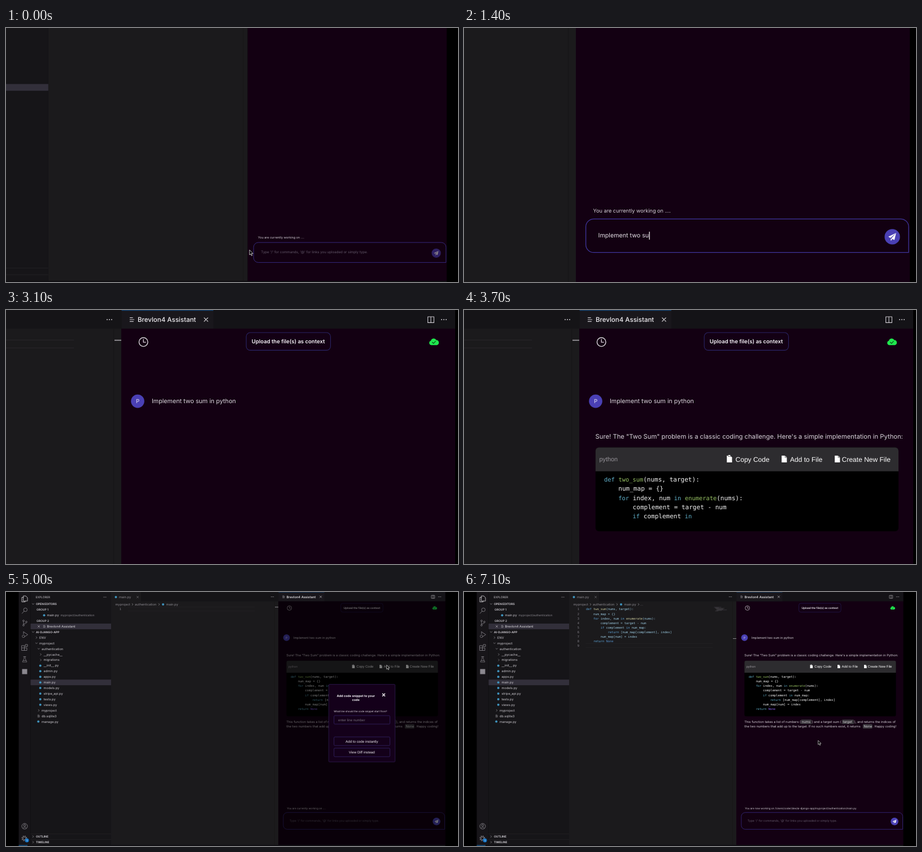
These frames come from a looping animation (800 px wide and 450 px high, 7.2 s). An HTML page:

```html
<!DOCTYPE html>
<html lang="en">
<head>
<meta charset="utf-8">
<title>Coding assistant demo</title>
<style>
  html, body { margin: 0; width: 100%; height: 100%; overflow: hidden; background: #000; }
  svg { display: block; width: 800px; height: 450px; }
  text { font-family: Inter, "Open Sans", sans-serif; white-space: pre; text-rendering: geometricPrecision; }
  .ui { font-family: "Liberation Sans", Arial, sans-serif; }
  .mono { font-family: "DejaVu Sans Mono", monospace; }
  .line { fill: none; stroke-linecap: round; stroke-linejoin: round; }
</style>
</head>
<body>
<svg id="stage" viewBox="0 0 800 450"></svg>
<script>
const LOOP = 7200, STEP = 100;
const PROMPT = 'Implement two sum in python';
const INTRO = 'Sure! The "Two Sum" problem is a classic coding challenge. Here\'s a simple implementation in Python:';
const CODE = [
  [0, 'def two_sum(nums, target):'],
  [1, 'num_map = {}'],
  [1, 'for index, num in enumerate(nums):'],
  [2, 'complement = target - num'],
  [2, 'if complement in num_map:'],
  [3, 'return [num_map[complement], index]'],
  [2, 'num_map[num] = index'],
  [1, 'return None']
];
const ASSISTANT = 'Brevlon4 Assistant';
const IDLE = 'You are currently working on ....';
const LINKED = 'You are now working on /Users/coder/dev/ai-django-app/myproject/authentication/main.py';
const GREY = '#8b888f', PALE = '#c9c6cc', VIOLET = '#4a40b4';

function el(tag, attrs, parent, text) {
  const node = document.createElementNS('http://www.w3.org/2000/svg', tag);
  for (const key in attrs) node.setAttribute(key, attrs[key]);
  if (text !== undefined) node.textContent = text;
  parent.append(node);
  return node;
}
const group = parent => el('g', {}, parent);
const rect = (p, x, y, x2, y2, fill, more) =>
  el('rect', { x, y, width: x2 - x, height: y2 - y, fill, ...more }, p);
const dot = (p, cx, cy, r, fill, more) => el('circle', { cx, cy, r, fill, ...more }, p);
const line = (p, d, stroke, width = 0.6) =>
  el('path', { d, stroke, 'stroke-width': width, class: 'line' }, p);
// y is the visual middle of the text
const text = (p, x, y, str, size, fill, more) =>
  el('text', { x, y: y + size * 0.35, 'font-size': size, fill, ...more }, p, str);
const show = (node, on) => node.setAttribute('visibility', on ? 'visible' : 'hidden');

const cam = group(document.getElementById('stage'));

function ellipsis(p, x, y) {
  for (const dx of [-2, 0, 2]) dot(p, x + dx, y, 0.5, PALE);
}
function cross(p, x, y, r, color, width) {
  line(p, `M${x - r} ${y - r}l${2 * r} ${2 * r}m0 ${-2 * r}l${-2 * r} ${2 * r}`, color, width);
}
function chevron(p, x, y, open) {
  line(p, open ? `M${x - 1.6} ${y - 0.8}l1.6 1.6 1.6 -1.6` : `M${x - 0.8} ${y - 1.6}l1.6 1.6 -1.6 1.6`, PALE, 0.5);
}
function listIcon(p, x, y) {
  line(p, `M${x - 1.8} ${y - 1.7}h2.400M${x - 1.8} ${y}h3.600M${x - 1.8} ${y + 1.7}h3`, PALE, 0.55);
}
const fileDot = (p, x, y) => dot(p, x, y, 2, '#3f93bd');

// Activity bar
function drawActivity() {
  const g = group(cam);
  rect(g, 22.5, 0, 43.5, 448, '#171519');
  line(g, 'M31 7h4l3 3v6h-7zM31 9.5h-3v8h6v-1.5', '#d8d6da', 0.8);
  dot(g, 34.3, 31.5, 3.2, 'none', { stroke: GREY, 'stroke-width': 0.8 });
  line(g, 'M32 34l-3.6 4', GREY, 0.8);
  for (const [x, y] of [[31, 51], [31, 59], [36, 53]])
    dot(g, x, y, 1.4, 'none', { stroke: GREY, 'stroke-width': 0.7 });
  line(g, 'M31 52.4v5.2M36 54.4q0 2-5 2.6', GREY, 0.7);
  line(g, 'M31 70.500l7.500 5 -6 4M31 70.500v4', GREY, 0.8);
  dot(g, 30.8, 78.5, 2.2, 'none', { stroke: GREY, 'stroke-width': 0.7 });
  line(g, 'M28 95h4.500v8.500h-4.500zM28 99h9v4.500h-4.500M34.500 93h3.600v3.600h-3.600z', GREY, 0.8);
  line(g, 'M31 114.500h4M32 114.500v3.500l-3 6h8l-3-6v-3.500M30.500 121.500h5', GREY, 0.7);
  rect(g, 28.5, 136.5, 37.5, 145.5, GREY);
  dot(g, 33, 415, 5, 'none', { stroke: GREY, 'stroke-width': 0.8 });
  dot(g, 33, 413.5, 1.8, 'none', { stroke: GREY, 'stroke-width': 0.8 });
  line(g, 'M29.800 418.500q3.200-4 6.400 0', GREY, 0.8);
  dot(g, 32.5, 436.5, 4, 'none', { stroke: GREY, 'stroke-width': 1.6, 'stroke-dasharray': '1.8 1.34' });
  dot(g, 32.5, 436.5, 2.4, 'none', { stroke: GREY, 'stroke-width': 0.8 });
  dot(g, 37, 440, 3.5, '#1677c9');
  text(g, 37, 440, '1', 4.4, '#fff', { 'text-anchor': 'middle' });
}

// Explorer
function drawExplorer() {
  const g = group(cam), rowY = i => 21.3 + 9.92 * i;
  const bold = { 'font-weight': 700 };
  rect(g, 43.5, 0, 186, 448, '#161518');
  for (const i of [4, 14]) rect(g, 43.5, rowY(i) - 5, 186, rowY(i) + 5, '#322f3a');
  text(g, 52.5, 9, 'EXPLORER', 5, PALE);
  ellipsis(g, 175, 9);
  text(g, 53, rowY(0), 'OPEN EDITORS', 5, PALE, bold);
  chevron(g, 48, rowY(0), true);
  text(g, 54, rowY(1), 'GROUP 1', 5, PALE, { 'font-weight': 600 });
  fileDot(g, 67.5, rowY(2));
  text(g, 72.5, rowY(2), 'main.py', 5.7, PALE);
  text(g, 96.5, rowY(2), 'myproject/authentication', 5.08, GREY);
  text(g, 54, rowY(3), 'GROUP 2', 5, PALE, { 'font-weight': 600 });
  cross(g, 58, rowY(4), 1.6, PALE, 0.6);
  listIcon(g, 68, rowY(4));
  text(g, 72.5, rowY(4), ASSISTANT, 5.7, '#dddbe0');
  text(g, 53, rowY(5), 'AI-DJANGO-APP', 5, PALE, bold);
  chevron(g, 48, rowY(5), true);
  // name, text x, kind: ">" closed folder, "v" open folder, "." file, "=" database
  const tree = [
    ['ENV', 59, '>'], ['myproject', 59, 'v'], ['authentication', 63, 'v'],
    ['__pycache__', 66.5, '>'], ['migrations', 66.5, '>'], ['__init__.py', 66.5, '.'],
    ['admin.py', 66.5, '.'], ['apps.py', 66.5, '.'], ['main.py', 66.5, '.'],
    ['models.py', 66.5, '.'], ['stripe_api.py', 66.5, '.'], ['tests.py', 66.5, '.'],
    ['views.py', 66.5, '.'], ['myproject', 63, '>'], ['db.sqlite3', 63, '='], ['manage.py', 63, '.']
  ];
  tree.forEach(([name, x, kind], i) => {
    const y = rowY(6 + i);
    if (kind === '.') fileDot(g, x - 5.8, y);
    else if (kind === '=') listIcon(g, x - 5, y);
    else chevron(g, x - 5, y, kind === 'v');
    text(g, x, y, name, 5.7, PALE);
  });
  [['OUTLINE', 433.3], ['TIMELINE', 443.2]].forEach(([name, y]) => {
    line(g, `M43.500 ${y - 4.6}H186`, '#2a282d', 0.5);
    chevron(g, 48, y, false);
    text(g, 53, y, name, 5, PALE, bold);
  });
}

// Code highlighting
const WORDS = /(\b(?:def|for|in|if|return|None|two_sum|enumerate)\b)/;
function kindOf(part) {
  if (part === 'None') return 'none';
  if (part === 'two_sum' || part === 'enumerate') return 'name';
  return WORDS.test(part) ? 'key' : 'plain';
}
const split = str => str.split(WORDS).filter(Boolean);

// Editor
let pasted, firstLine, caretRow, crumbMore;
function drawEditor() {
  const g = group(cam), rowY = i => 30.6 + 8.08 * i;
  const colors = { plain: '#9ccbe2', key: '#5fa5d8', name: '#cfcfa0', none: '#5691cc' };
  rect(g, 186, 0, 482, 448, '#1b1a1c');
  rect(g, 239, 0, 482, 16.5, '#151417');
  fileDot(g, 194.5, 9);
  text(g, 200, 9, 'main.py', 5.7, GREY);
  cross(g, 233, 9, 1.6, GREY, 0.5);
  ellipsis(g, 471.5, 8.5);
  text(g, 193.5, 22, 'myproject', 5.6, GREY);
  chevron(g, 224, 22, false);
  text(g, 228, 22, 'authentication', 5.7, GREY);
  chevron(g, 271, 22, false);
  fileDot(g, 278, 22);
  text(g, 283.5, 22, 'main.py', 5.7, GREY);
  crumbMore = group(g);
  chevron(crumbMore, 309, 22, false);
  text(crumbMore, 312, 22, '...', 5.6, GREY);
  line(g, 'M475.300 17V448', '#161517', 0.5);

  const number = (p, i) => text(p, 204, rowY(i), i + 1, 5.37, '#85828a', { 'text-anchor': 'end', class: 'mono' });
  firstLine = number(g, 0);
  pasted = group(g);
  for (let i = 0; i < 9; i++) number(pasted, i);
  CODE.forEach(([depth, str], i) => {
    const row = text(pasted, 216 + depth * 12.93, rowY(i), '', 5.37, '', { class: 'mono' });
    for (const part of split(str)) el('tspan', { fill: colors[kindOf(part)] }, row, part);
    line(pasted, `M${443 + depth * 1.9} ${27 + i * 0.95}h${str.length * 0.46}`, '#625f66', 0.4);
  });
  caretRow = group(g);
  line(caretRow, 'M216 26.600H440M216 33.600H440', '#29272b', 0.5);
}

// Chat panel
const stream = [];
let streamLength = 0;
function streamed(node, str, box) {
  stream.push({ node, str, box, from: streamLength });
  streamLength += str.length;
}
function pageIcon(p, x, y, clip) {
  el('path', { d: `M${x - 2.3} ${y - 3}h3l1.600 1.600v4.400h-4.600z`, fill: '#fff' }, p);
  if (clip) rect(p, x - 1.2, y - 3.6, x + 1, y - 2.2, '#fff', { stroke: '#2d2c2f', 'stroke-width': 0.3 });
  else line(p, `M${x + 0.7} ${y - 3}v1.600h1.600`, '#2d2c2f', 0.35);
}

let message, block, blockBody, label, typed, hint, caret, send;
function drawChat() {
  const g = group(cam);
  rect(g, 482, 0, 777.5, 448, '#130012');
  rect(g, 482, 0, 777.5, 16.5, '#141317');
  rect(g, 482.3, 0, 563.5, 16.5, '#19171c');
  rect(g, 482.3, 0, 563.5, 0.6, '#174878');
  listIcon(g, 491.5, 8.5);
  text(g, 496.5, 8.5, ASSISTANT, 5.75, '#f2f0f4', { 'font-weight': 500 });
  cross(g, 557, 8.5, 1.6, '#e0dee2', 0.6);
  line(g, 'M753.300 6h5.400v5.200h-5.400zM756 6v5.200', PALE, 0.55);
  ellipsis(g, 767.5, 8.5);

  dot(g, 501.6, 28.4, 3.9, 'none', { stroke: '#d8d4da', 'stroke-width': 0.7 });
  line(g, 'M501.600 26v2.600h2', '#d8d4da', 0.65);
  rect(g, 592.6, 20, 667.2, 35.7, '#130014', { rx: 3.6, stroke: '#2a2464', 'stroke-width': 0.55 });
  text(g, 629.8, 27.9, 'Upload the file(s) as context', 4.78, '#f4f2f6', { 'font-weight': 600, 'text-anchor': 'middle' });
  el('path', { d: 'M756.300 31.100a2 2 0 0 1-.3-3.900 2.600 2.600 0 0 1 4.800-.6 2.300 2.300 0 0 1 .6 4.500z', fill: '#1fe84e' }, g);
  line(g, 'M757.300 28.600l1.100 1 1.700-1.900', '#0b4a1b', 0.6);

  message = group(g);
  dot(message, 496.5, 80.8, 5.9, VIOLET);
  text(message, 496.5, 80.8, 'P', 4.9, '#e4e0f4', { 'text-anchor': 'middle' });
  text(message, 509, 80.8, PROMPT, 5.35, '#dcd8de');

  const body = '#d6d2d8';
  streamed(text(g, 496.3, 112.1, '', 5.62, body), INTRO);

  block = group(g);
  blockBody = rect(block, 496.4, 121.8, 764.5, 220.3, '#000', { rx: 3 });
  el('path', { d: 'M496.400 142.900v-18.100a3 3 0 0 1 3-3h262.100a3 3 0 0 1 3 3v18.100z', fill: '#2d2c2f' }, block);
  text(block, 499.8, 132.3, 'python', 5.4, '#98959b', { class: 'ui' });
  [['Copy Code', 620.3, 614.9], ['Add to File', 668.5, 663.4], ['Create New File', 714.4, 710.4]]
    .forEach(([name, x, iconX], i) => {
      pageIcon(block, iconX, 132, i === 0);
      text(block, x, 132.2, name, 6, '#fff', { class: 'ui' });
    });
  const colors = { plain: '#f2f2f2', key: '#62b2cc', name: '#98c264', none: '#8a60ee' };
  CODE.forEach(([depth, str], i) => {
    const row = text(block, 504 + depth * 12.65, 150.2 + i * 8.12, '', 5.5, '', { class: 'mono' });
    for (const part of split(str)) {
      const kind = kindOf(part);
      streamed(el('tspan', { fill: colors[kind], 'font-size': kind === 'plain' ? 5.53 : 5.2 }, row), part);
    }
  });

  const say = (x, y, str) => streamed(text(g, x, y, '', 5.62, body), str);
  const chip = (x, x2, y, str) => {
    const box = rect(g, x, y - 4, x2, y + 4, '#38343a', { rx: 1.6 });
    streamed(text(g, x + 1.6, y, '', 5.9, body), str, box);
  };
  say(496.3, 230.1, 'This function takes a list of numbers (');
  chip(596.2, 615.4, 230.1, 'nums');
  say(616, 230.1, ') and a target sum (');
  chip(669, 690.2, 230.1, 'target');
  say(690.7, 230.1, '), and returns the indices of');
  say(496.3, 238.1, 'the two numbers that add up to the target. If no such numbers exist, it returns ');
  chip(705.8, 722.8, 238.1, 'None');
  say(723.4, 238.1, '. Happy coding!');

  label = text(g, 497.3, 383.3, '', 4.57, '#d6d2d8');
  el('path', {
    d: 'M497.800 390.700H769.500a7 7 0 0 1 7 7V420.400H497.800a7 7 0 0 1-7-7V397.700a7 7 0 0 1 7-7z',
    fill: '#120011', stroke: '#3f359c', 'stroke-width': 0.65
  }, g);
  hint = text(g, 501.8, 405, "Type '/' for commands, '@' for links you uploaded or simply type.", 5.15, '#63586a');
  typed = text(g, 501.8, 405.4, '', 5.35, '#e4e0e6');
  caret = rect(g, 0, 402, 0.6, 409, '#fff');
  send = group(g);
  dot(send, 762, 406.5, 6.8, VIOLET);
  el('path', { d: 'M765.400 403.100l-6.900 3.300 1.900 1.100zM765.400 403.100l-4.300 4.900 2.800 1.300zM760.600 408.100l1.400.7-1.300 1.300z', fill: '#fff' }, send);
}

// Dialog
let dialog, lineHint, lineValue;
function drawDialog() {
  dialog = group(cam);
  rect(dialog, 482, 16.5, 777.5, 448, '#000', { opacity: 0.52 });
  rect(dialog, 571.2, 163.6, 688.6, 301, '#14001a', { rx: 1.5, stroke: '#3c2768', 'stroke-width': 0.6 });
  const mid = { 'text-anchor': 'middle', 'font-weight': 700 };
  text(dialog, 619.2, 184, 'Add code snippet to your', 5.5, '#f4f2f6', mid);
  text(dialog, 619.2, 191.2, 'code', 5.5, '#f4f2f6', mid);
  cross(dialog, 668.5, 182.2, 2, '#fff', 1.5);
  text(dialog, 580.3, 211.3, 'What line should the code snippet start from?', 4.4, '#e6e2e8');
  const edge = { rx: 1.6, stroke: '#3d2f7c', 'stroke-width': 0.6 };
  rect(dialog, 580.5, 219, 679.5, 234, '#14001a', edge);
  lineHint = text(dialog, 588, 226.5, 'enter line number', 6.1, '#77717c', { class: 'ui' });
  lineValue = text(dialog, 588, 226.5, '1', 6.1, '#eee', { class: 'ui' });
  [['Add to code instantly', 264.4], ['View Diff instead', 284.2]].forEach(([name, y]) => {
    rect(dialog, 580.5, y - 7.6, 679.5, y + 7.6, '#14001a', edge);
    text(dialog, 629.8, y, name, 6.2, '#f0eef2', { class: 'ui', 'text-anchor': 'middle' });
  });
}

drawActivity();
drawExplorer();
drawEditor();
drawChat();
const marker = rect(cam, 476, 0, 482, 0.8, '#a5a2a8');
rect(cam, 22.5, 448, 777.5, 450, '#111014');
rect(cam, 22.5, 448, 38, 450, '#123f66');
drawDialog();
const pointer = el('path', {
  d: 'M0 0v7.300l1.700-1.500 1.200 2.700 1.200-.5-1.200-2.700h2.300z',
  fill: '#000', stroke: '#fff', 'stroke-width': 0.6
}, cam);

// time, zoom, focus x, focus y
const CAMERA = [
  [-156, 1, 764.5, 447], [400, 2, 765, 444.2], [2400, 2, 767, 442], [2500, 2, 767, 442],
  [3100, 2, 760, 0], [4022, 2, 760, 0], [4812, 1, 760, 0], [LOOP, 1, 760, 0]
];
// time, x, y
const POINTER = [
  [0, 484.7, 401.8], [300, 502, 404], [4400, 762, 406], [4800, 673.6, 129.4], [5100, 673.6, 129.4],
  [5400, 628, 226], [5900, 628, 226], [6200, 626.8, 263], [LOOP, 626.8, 263]
];
function track(keys, t) {
  const i = keys.findIndex(k => k[0] > t), a = keys[i - 1], b = keys[i];
  const u = (t - a[0]) / (b[0] - a[0]), e = u * u * (3 - 2 * u);
  return a.slice(1).map((v, n) => v + (b[n + 1] - v) * e);
}

// Characters of the answer that are out at 3700 ms
const anchor = INTRO.length + CODE.slice(0, 4).reduce((n, row) => n + row[1].length, 0) + 'if complement in'.length;

function drawStream(t) {
  const n = Math.round(anchor + (t - 3700) * 0.48);
  for (const { node, str, box, from } of stream) {
    node.textContent = str.slice(0, Math.max(0, n - from));
    if (box) show(box, n > from);
  }
  show(block, n > INTRO.length);
  let left = n - INTRO.length, rows = 0;
  while (rows < CODE.length && left > 0) left -= CODE[rows++][1].length;
  blockBody.setAttribute('height', 33.6 + Math.max(1, rows) * 8.12);
}

function draw(t) {
  const [zoom, fx, fy] = track(CAMERA, t);
  cam.setAttribute('transform', `translate(${fx - zoom * fx} ${fy - zoom * fy}) scale(${zoom})`);
  const [px, py] = track(POINTER, t);
  pointer.setAttribute('transform', `translate(${px} ${py})`);
  show(pointer, t < 300 || t >= 4500);

  const typing = t >= 300 && t < 2500;
  const count = t < 400 ? 0 : 1 + Math.floor((t - 400) / 65);
  typed.textContent = typing ? PROMPT.slice(0, count) : '';
  show(hint, !typing);
  show(caret, typing && t < 2200);
  caret.setAttribute('x', 502.2 + (count ? typed.getComputedTextLength() - 0.2 : 0));
  send.setAttribute('opacity', t < 200 ? 0.5 : 1);

  show(message, t >= 2500);
  drawStream(t);

  show(dialog, t >= 4900 && t < 6400);
  const filled = t >= 5700 && t < 6400;
  show(lineHint, t >= 4900 && t < 5700);
  show(lineValue, filled);

  const done = t >= 6400;
  show(pasted, done);
  show(crumbMore, done);
  show(firstLine, !done);
  caretRow.setAttribute('transform', `translate(0 ${done ? 64.6 : 0})`);
  marker.setAttribute('y', done ? 82 : 26.4);
  label.textContent = t >= 6500 ? LINKED : IDLE;
}

let start;
function frame(now) {
  if (start === undefined) start = now;
  const t = (now - start + 10) % LOOP;
  draw(Math.floor(t / STEP) * STEP);
  requestAnimationFrame(frame);
}
draw(0);
requestAnimationFrame(frame);
</script>
</body>
</html>
```
